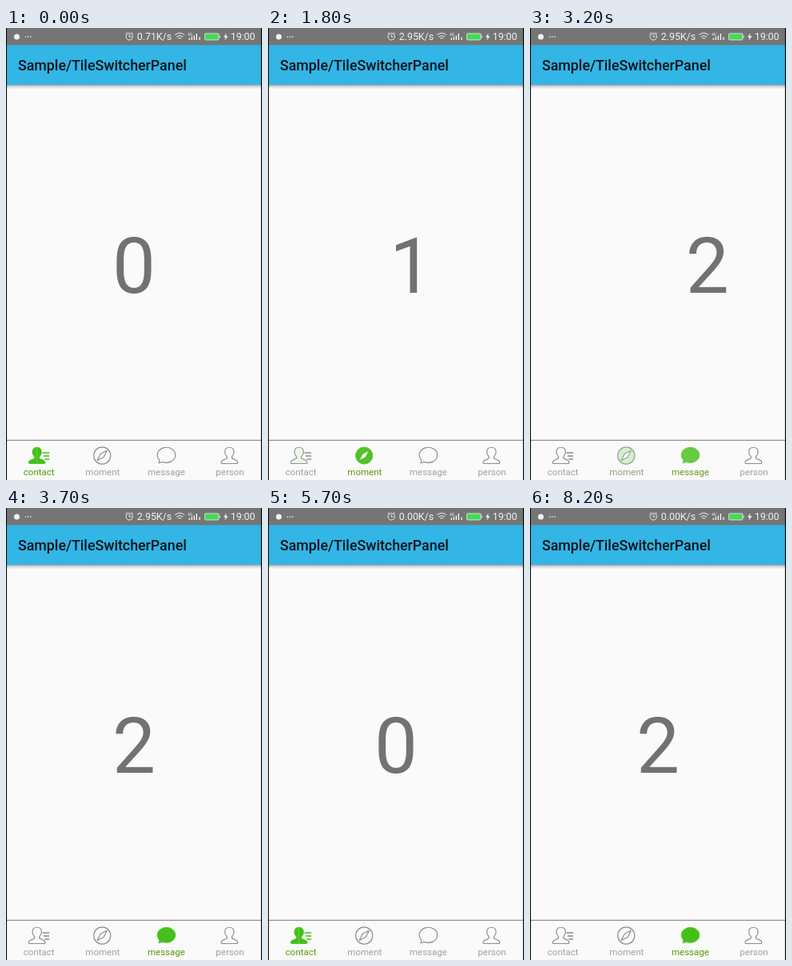
An HTML page that plays this animation: 320 px wide and 565 px high, repeating every 8300 ms.

```html
<!DOCTYPE html>
<html lang="en">
<head>
<meta charset="utf-8">
<title>Tab pager</title>
<style>
  html, body { margin: 0; width: 100%; height: 100%; overflow: hidden; background: #fafafa; }
  svg { display: block; width: 100%; height: 100%; }
  text { font-family: Roboto, sans-serif; }
  .status text { font-size: 12.4px; fill: #f2f2f2; }
  .line { fill: none; stroke: #f0f0f0; }
  .digits { font-size: 96px; fill: #727272; text-anchor: middle; }
  .label { font-size: 11.5px; text-anchor: middle; }
  .off { fill: none; stroke: #8c8c8c; stroke-width: 1.15; stroke-linejoin: round; }
  .on { fill: #45c01a; fill-rule: evenodd; stroke: #45c01a; stroke-width: .8; stroke-linejoin: round; }
  .rows { stroke-width: 1.5; }
</style>
</head>
<body>
<svg viewBox="0 0 320 565" preserveAspectRatio="none">
  <defs>
    <linearGradient id="shade" x2="0" y2="1">
      <stop offset="0" stop-opacity=".36"/>
      <stop offset=".4" stop-opacity=".13"/>
      <stop offset="1" stop-opacity="0"/>
    </linearGradient>
    <path id="half" d="M0 -10.3C3.9 -10.3 5.7 -7.8 5.7 -4.8C5.7 -1.9 4.5 .1 3 1.5C2.6 3.2 3.4 3.8 5 4.4C8.6 5.6 10.4 6.7 10.4 8.7Q10.4 10 9 10H0"/>
  </defs>

  <g id="digits" class="digits"></g>

  <rect y="71" width="320" height="5.5" fill="url(#shade)"/>
  <rect y="21" width="320" height="50" fill="#33b5e5"/>
  <text x="15" y="52.8" font-size="17.8" font-weight="500" fill="#06141a">Sample/TileSwitcherPanel</text>

  <g class="status">
    <rect width="320" height="21.3" fill="#757575"/>
    <circle cx="13.5" cy="11" r="3.5" fill="#f2f2f2"/>
    <path class="line" d="M24 11h7.5" stroke-width="1.3" stroke-dasharray="1.3 1.8"/>
    <circle class="line" cx="154.2" cy="10.8" r="4.2"/>
    <path class="line" d="M154.2 8.2v2.8h2.2M149.6 7.4l2-1.9M158.8 7.4l-2-1.9"/>
    <text id="speed" x="163.7" y="15.2"></text>
    <path class="line" d="M211.2 8.6q6-4.6 12 0M213.2 11q4-3 8 0M215.2 13.2q2-1.5 4 0"/>
    <text x="227" y="9.6" style="font-size:5px">4G</text>
    <path class="line" d="M229.3 15v-2.5M232.3 15v-4M235.3 15v-5.5M238.3 15v-8M242 15v-3.5" stroke-width="1.4"/>
    <rect x="248.5" y="6.9" width="17.4" height="8" rx="1" fill="#45d95a" stroke="#e2e2e2" stroke-width=".9"/>
    <path class="line" d="M267 9.3v3.2"/>
    <path d="M275.6 6.6l-3.6 4.9h2.4l-.9 4 4.1-5.2h-2.6z" fill="#f2f2f2"/>
    <text x="280.7" y="15.2">19:00</text>
  </g>

  <path d="M0 515.4h320" stroke="#909090" stroke-width="1.1"/>
  <g id="tabs"></g>
  <path d="M.5 0v565M319.4 0v565" stroke="#0c0c0c" stroke-width="1.2"/>
</svg>

<script>
const LOOP = 8300, STEP = 100, WIDTH = 320;
const GRAY = [160, 160, 160], GREEN = [84, 154, 8];

// Each swipe moves one page on; the taps then open pages 0, 1 and 2.
const SWIPES = [
  { start: 700, length: 1480 },
  { start: 2400, length: 1300 },
  { start: 4000, length: 1300 }
];
const TAPS = [5700, 6200, 6500];

// Icons are centred on their tab.
const person = x => `<g transform="translate(${x})">
  <use href="#half"/><use href="#half" transform="scale(-1 1)"/></g>`;
const TABS = {
  contact: person(-2.5) + '<path class="rows" d="M4.3 -3.5h8.6M5.8 .5h7.1M7.1 4.5h5.8"/>',
  moment: '<path d="M-11.2 0a10.6 10.6 0 0 1 21.2 0a10.6 10.6 0 0 1 -21.2 0Z' +
    'M5.4 -6.2L1.4 2L-6.6 6L-2.6 -2.2Z"/>',
  message: '<path d="M-5.2 7.7A11.3 9.5 0 1 0 -8.8 5.2Q-8.6 7.5 -9.5 9.2Q-7 9 -5.2 7.7Z"/>',
  person: person(-.7)
};

const $ = id => document.getElementById(id);
const digits = $("digits"), speed = $("speed");
const names = Object.keys(TABS);

digits.innerHTML = names.map((_, i) =>
  `<text x="${160 + i * WIDTH}" y="330.9">${i}</text>`).join("");
$("tabs").innerHTML = names.map((name, i) =>
  `<g transform="translate(${41.2 + i * 79.6} 534.5)">
     <g class="off">${TABS[name]}</g><g class="on">${TABS[name]}</g>
     <text class="label" y="24.2">${name}</text></g>`).join("");
const tabs = [...$("tabs").children].map(g => [...g.children]);

// Steady drag that turns into a soft settle.
function swipe(x) {
  x = Math.min(1, Math.max(0, x));
  return 1 - (1 - x) ** (1 + x + 2 * x ** 6);
}

function position(t) {
  const taps = TAPS.filter(time => time <= t).length;
  if (taps) return taps - 1;
  return SWIPES.reduce((sum, s) => sum + swipe((t - s.start) / s.length), 0);
}

const mix = (a, b, k) => `rgb(${a.map((v, i) => Math.round(v + (b[i] - v) * k))})`;

function draw(now) {
  const t = Math.floor(now % LOOP / STEP) * STEP;
  const p = position(t);
  digits.setAttribute("transform", `translate(${-p * WIDTH})`);
  tabs.forEach(([off, on, label], i) => {
    const k = Math.max(0, 1 - Math.abs(p - i));
    off.style.opacity = 1 - k;
    on.style.opacity = k;
    label.style.fill = mix(GRAY, GREEN, k);
  });
  speed.textContent = (t < 1100 ? "0.71" : t < 5100 ? "2.95" : "0.00") + "K/s";
}

const start = performance.now();
function tick() {
  draw(performance.now() - start);
  requestAnimationFrame(tick);
}
tick();
</script>
</body>
</html>
```
